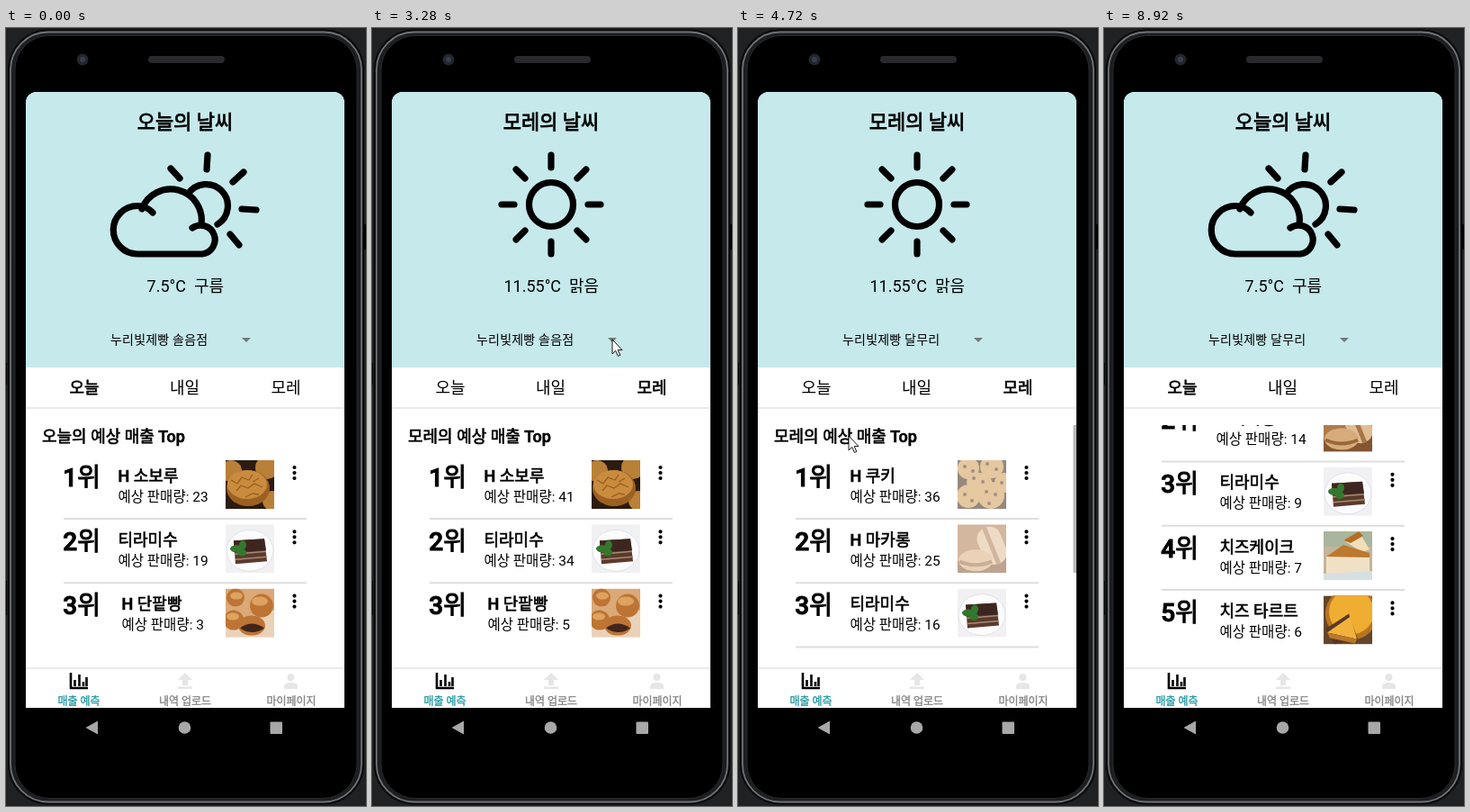
Recreate the animation shown at these times as an HTML page. Size 400 by 864 pixels, loop 8.96 s.

```html
<!DOCTYPE html>
<html lang="ko">
<head>
<meta charset="utf-8">
<title>Sales forecast</title>
<style>
  html, body { margin: 0; width: 100%; height: 100%; overflow: hidden; background: #202123; }
  svg { display: block; width: 400px; height: 864px; }
  text { font: 18px Roboto, "Noto Sans CJK KR", "Noto Sans CJK", sans-serif; white-space: pre; }
  .mid { text-anchor: middle; }
  .bold { font-weight: 500; stroke: #000; stroke-width: .036em; }
  .title { font-size: 22px; }
  .rank { font-size: 28px; }
  .sales { font-size: 15.5px; }
  .store { font-size: 14px; letter-spacing: .2px; }
  .tab { font-size: 12px; font-weight: 500; fill: #858585; stroke: #858585; stroke-width: .03em; }
  .active { fill: #259ba4; stroke: #259ba4; }
  .icon { fill: none; stroke: #000; stroke-width: 7.2; stroke-linecap: round; stroke-linejoin: round; }
</style>
</head>
<body>
<svg viewBox="0 0 400 864">
  <defs>
    <clipPath id="screen"><path d="M22 755V83a12 12 0 0 1 12-12H364a12 12 0 0 1 12 12V755z"/></clipPath>
    <clipPath id="view"><rect x="22" y="441" width="354" height="252"/></clipPath>
    <clipPath id="photo"><rect width="54" height="54"/></clipPath>
    <g id="soboru">
      <rect width="54" height="54" fill="#2c1b0f"/>
      <g fill="#b98038"><circle cx="46" cy="8" r="13"/><circle cx="6" cy="12" r="12"/><circle cx="52" cy="45" r="11"/></g>
      <ellipse cx="25" cy="31" rx="24" ry="20" fill="#9c6122"/><ellipse cx="24" cy="27" rx="22" ry="16" fill="#c98b3e"/>
      <path d="M6 22l7 4 5-7 8 3 4-6M12 34l5-6 8 3 7-5 9 4M22 41l8-4 7 1M30 24l7-4" fill="none" stroke="#98601f" stroke-width="1.3"/>
    </g>
    <g id="tiramisu">
      <rect width="54" height="54" fill="#f1f1f4"/>
      <ellipse cx="27" cy="29" rx="26" ry="23" fill="#fcfcfd" stroke="#dfe0e6"/>
      <path d="M9 18l34-2 3 25-35 3z" fill="#5b3a2c"/><path d="M9 18l34-2 2 13-35 2z" fill="#3d2620"/>
      <path d="M10 33l35-3M11 39l35-3" stroke="#a58a75" stroke-width="1.5"/>
      <g fill="#34782e"><ellipse cx="12" cy="27" rx="7" ry="4"/><ellipse cx="18" cy="31" rx="5" ry="4"/><ellipse cx="19" cy="23" rx="4" ry="5"/></g>
    </g>
    <g id="bun">
      <rect width="54" height="54" fill="#dba878"/><path d="M0 38l54-14v30H0z" fill="#e9d2b8"/>
      <g fill="#bd7434"><circle cx="11" cy="10" r="10"/><circle cx="40" cy="19" r="13"/><circle cx="9" cy="35" r="11"/><ellipse cx="29" cy="41" rx="15" ry="11"/></g>
      <g fill="#dda35f"><ellipse cx="12" cy="8" rx="7" ry="4"/><ellipse cx="38" cy="14" rx="9" ry="5"/><ellipse cx="8" cy="31" rx="7" ry="4"/></g>
      <path d="M16 44q13-10 27 0-13 9-27 0z" fill="#40251c"/>
    </g>
    <g id="cookie">
      <rect width="54" height="54" fill="#3c2413"/>
      <g fill="#d09a50"><circle cx="12" cy="9" r="12"/><circle cx="38" cy="7" r="13"/><circle cx="52" cy="25" r="11"/><circle cx="12" cy="40" r="13"/><circle cx="37" cy="39" r="15"/><ellipse cx="24" cy="24" rx="14" ry="10"/></g>
      <path d="M8 7h0m9 5h0m16-8h0m10 6h0m6 15h0m-31-5h0m10 4h0m-20 14h0m8 7h0m16-10h0m10 3h0m-7 10h0" stroke="#593018" stroke-width="4" stroke-linecap="round"/>
    </g>
    <g id="macaron">
      <rect width="54" height="54" fill="#ad7b4d"/><path d="M0 40l54-9v23H0z" fill="#845532"/>
      <g transform="rotate(-22 38 22)"><rect x="24" y="2" width="27" height="43" rx="13" fill="#e0bd93"/><path d="M37 2v43" stroke="#a67749" stroke-width="5"/></g>
      <ellipse cx="20" cy="40" rx="19" ry="12" fill="#d7ac7c"/><path d="M2 41q18 8 36 0" fill="none" stroke="#9b673b" stroke-width="4"/>
    </g>
    <g id="cheesecake">
      <rect width="54" height="54" fill="#c4b49b"/><path d="M0 0h54v17H0z" fill="#a9b59c"/>
      <path d="M22 10L39 0l12 20-8 3z" fill="#f2dfba"/><path d="M22 10L39 0l5 5-14 8z" fill="#b56c25"/>
      <path d="M3 28l19-12 29 9v21L3 48z" fill="#f0e1c6"/><path d="M3 28l19-13 29 9v5z" fill="#bd792e"/>
      <path d="M0 47l54-3v10H0z" fill="#d6e0e0"/>
    </g>
    <g id="tart">
      <rect width="54" height="54" fill="#65452c"/><circle cx="31" cy="20" r="29" fill="#b87520"/><circle cx="31" cy="18" r="25" fill="#efad31"/>
      <path d="M28 20l-26 17 10 17 26-6z" fill="#5b3822"/><path d="M30 23L4 41l33 7z" fill="#f1b23c"/><path d="M4 41l33 7-2 5-28-6z" fill="#b8782a"/>
    </g>
  </defs>

  <rect width="400" height="864" fill="#202123"/>
  <rect x="3" y="2.500" width="394" height="859" rx="44" fill="#17181a" stroke="#0a0a0b" stroke-width="2"/>
  <rect x="5" y="4.500" width="390" height="855" rx="42" fill="#1d1e20" stroke="#6f7277" stroke-width="1.800"/>
  <rect x="10" y="8.500" width="380" height="847" rx="38" fill="#000" stroke="#28292c"/>
  <path d="M0 372v24M399 218v28M0 614v38" stroke="#000" stroke-width="2"/>
  <rect x="158" y="31" width="85" height="8" rx="4" fill="#29292c"/>
  <circle cx="85" cy="35" r="6.500" fill="#24262b"/><circle cx="85" cy="35" r="3" fill="#34404f"/>

  <g clip-path="url(#screen)">
    <rect x="22" y="71" width="354" height="685" fill="#fff"/>
    <rect x="22" y="71" width="354" height="306" fill="#c6e9eb"/>
    <text id="title" class="bold title mid" x="199" y="112"></text>
    <path id="sun" class="icon"/>
    <path id="cloud" class="icon" d="M163 205Q156 197.500 146 197.500a26.750 26.750 0 0 0 0 53.500H218a16 16 0 1 0-11-29M151 201A34.300 34.300 0 0 1 217 218M202.300 184.500A24 24 0 1 1 235 218M183 156l10 11M224 141l-1 16M264 160l-12 11M262 201l16 1M249 229l10 12"/>
    <text id="temp" class="mid" x="199.300" y="293"></text>
    <text id="store" class="store" x="116" y="351"></text>
    <path d="M262 344h10l-5 5z" fill="#737879"/>
    <g id="days"></g>
    <path d="M22 422H376M22 711H376" stroke="#e3e3e3" stroke-width="1.600"/>

    <g clip-path="url(#view)">
      <g id="list"></g>
      <path id="glow" d="M22 441H376V457Q199 493 22 457z" fill="#eee" opacity="0"/>
      <rect id="bar" x="372.500" width="3.500" height="164" fill="#b8b8b8"/>
    </g>

    <path d="M72 716V733H91M76.500 731V724M81.500 731V718M86 731V726M89.500 731V721" fill="none" stroke="#000" stroke-width="2.600"/>
    <path d="M199 716l8 8h-5v6h-6v-6h-5zM191 731.500h16v2.500h-16zM309 734v-3q0-4 7.500-4t7.500 4v3z" fill="#e6e6e6"/>
    <circle cx="316.500" cy="721" r="4" fill="#e6e6e6"/>
    <text class="tab active mid" x="81" y="752">매출 예측</text>
    <text class="tab mid" x="199" y="752">내역 업로드</text>
    <text class="tab mid" x="317" y="752">마이페이지</text>

    <rect id="dim" x="22" y="71" width="354" height="685" opacity="0"/>
    <g id="status" fill="#fff">
      <text x="29" y="86" style="font-size:13px">1:56</text>
      <circle cx="69.500" cy="81.500" r="4" fill="none" stroke="#fff" stroke-width="2.600"/>
      <circle cx="69.500" cy="81.500" r="5.300" fill="none" stroke="#fff" stroke-dasharray="2 2.160"/>
      <circle cx="89.500" cy="81.500" r="6.500"/><rect x="104" y="76" width="12" height="11"/>
      <path d="M130 75l5.500 2v4q0 5-5.500 7-5.500-2-5.500-7v-4z"/><circle cx="149.500" cy="81.500" r="1.800"/>
      <path d="M329 78q6.500-5 13 0l-6.500 9zM344 87l10-11v11zM362 77h2v-1.500h3V77h2v10h-7z"/>
    </g>
    <g id="dialog">
      <rect x="45" y="352" width="307" height="144" rx="2" fill="#fff" style="filter:drop-shadow(0 5px 9px #0007)"/>
      <rect id="pressed" x="104" y="445" width="191" height="45" rx="3" opacity=".08"/>
    </g>
  </g>

  <path d="M102 769.500v15l-13.500-7.500z" fill="#a8a8a8"/>
  <circle cx="198.500" cy="777" r="6.800" fill="#a8a8a8"/>
  <rect x="293.500" y="770.500" width="13.500" height="13.500" rx="1" fill="#a8a8a8"/>
  <path id="cursor" d="M0 0V16l3.700-3.600 2.700 6 2.400-1-2.600-5.800H11z" fill="#fff" stroke="#000" stroke-width=".9"/>
</svg>
<script>
const LOOP = 8960, MAX_SCROLL = 134.8, PITCH = 71.3;
const $ = id => document.getElementById(id);
const set = (id, name, value) => $(id).setAttribute(name, value);
const show = (id, on) => $(id).style.display = on ? '' : 'none';
const clamp = v => Math.max(0, Math.min(1, v));
const label = (x, y, cls, text) => `<text x="${x}" y="${y}" class="${cls}">${text}</text>`;

const days = ['오늘', '내일', '모레'];
const temps = ['7.5°C  구름', '8.49°C  맑음', '11.55°C  맑음'];
const stores = ['누리빛제빵 솔음점', '누리빛제빵 해온점', '누리빛제빵 달무리'];
const shortMenu = [['H 소보루', 'soboru'], ['티라미수', 'tiramisu'], ['H 단팥빵', 'bun']];
const longMenu = [['H 쿠키', 'cookie'], ['H 마카롱', 'macaron'], ['티라미수', 'tiramisu'],
  ['치즈케이크', 'cheesecake'], ['치즈 타르트', 'tart']];

// start time, day, store, sales per row (none while loading)
const scenes = [
  [0, 0, 0, [23, 19, 3]],
  [1340, 1, 0, []],
  [1560, 1, 0, [41, 34, 5]],
  [2640, 2, 0, []],
  [2900, 2, 0, [41, 34, 5]],
  [3920, 2, 2, [41, 34, 5]],
  [4120, 2, 2, []],
  [4560, 2, 2, [36, 25, 16, 12, 9]],
  [5360, 0, 2, []],
  [5860, 0, 2, [20, 14, 9, 7, 6]]
];
const pointer = [[380, 398, 440], [900, 205, 402], [2180, 200, 400], [2460, 318, 402], [2900, 318, 402],
  [3200, 267, 346], [3460, 267, 346], [3740, 161, 502], [4050, 161, 502], [4680, 123, 453], [4820, 123, 453],
  [5200, 87, 400], [5500, 87, 400], [5720, 96, 446], [5780, 96, 446], [6120, 165, 640], [6420, 165, 500],
  [6560, 165, 480], [6800, 163, 616], [6960, 163, 616], [7400, 165, 430], [8000, 165, 400]];
const scrolling = [[6150, 0], [6420, MAX_SCROLL], [6560, MAX_SCROLL], [6800, 0], [6960, 0], [7700, MAX_SCROLL]];

function track(keys, t) {
  const i = keys.findIndex(k => k[0] > t);
  if (i < 0) return keys[keys.length - 1].slice(1);
  if (i === 0) return keys[0].slice(1);
  const a = keys[i - 1], b = keys[i];
  let p = (t - a[0]) / (b[0] - a[0]);
  p = p * p * (3 - 2 * p);
  return a.slice(1).map((v, n) => v + (b[n + 1] - v) * p);
}

function row(menu, count, i) {
  const y = i * PITCH, x = count > 9 ? 124.5 : 128.5;
  const [name, picture] = menu[i];
  const line = i < menu.length - 1 ? `<path d="M64 ${545 + y}H334" stroke="#dedede" stroke-width="2"/>` : '';
  return label(63.3, 508.5 + y, 'bold rank', i + 1 + '위') + label(x, 503.5 + y, 'bold', name) +
    label(x, 525.5 + y, 'sales', '예상 판매량: ' + count) +
    `<g class="${picture}" transform="translate(244 ${480 + y})" clip-path="url(#photo)"><use href="#${picture}"/></g>` +
    `<path d="M320.500 ${488 + y}v0m0 6v0m0 6v0" stroke="#000" stroke-width="4.200" stroke-linecap="round"/>` + line;
}

function build([, day, store, sales]) {
  $('title').textContent = days[day] + '의 날씨';
  $('temp').textContent = temps[day];
  $('store').textContent = stores[store];
  show('cloud', day === 0);
  show('sun', day > 0);
  $('days').innerHTML = days.map((d, i) => label([87, 198.5, 311][i], 406, i === day ? 'mid bold' : 'mid', d)).join('');
  const menu = sales.length > 3 ? longMenu : shortMenu;
  $('list').innerHTML = label(40, 459.5, 'bold', days[day] + '의 예상 매출 Top') +
    sales.map((n, i) => row(menu, n, i)).join('');
}

let current;
function draw(now) {
  const t = now % LOOP;
  const scene = scenes.filter(s => s[0] <= t).pop();
  if (scene !== current) build(current = scene);

  const [scroll] = track(scrolling, t);
  set('list', 'transform', `translate(0 ${-scroll})`);
  set('bar', 'y', 441 + 90 * scroll / MAX_SCROLL);
  set('bar', 'opacity', scene[3].length > 3 ? clamp((8400 - t) / 250) : 0);
  set('glow', 'opacity', t > 6750 ? .22 * clamp((7100 - t) / 200) : 0);
  for (const p of ['cookie', 'macaron'])
    document.querySelectorAll('#list .' + p).forEach(el => el.setAttribute('opacity', clamp((t - 4560) / 300)));

  const open = t < 3920 ? clamp((t - 3480) / 200) : clamp((4220 - t) / 300);
  set('dim', 'opacity', .6 * open);
  set('dialog', 'opacity', open * open);
  show('status', open > 0);
  show('pressed', t > 3920);

  const [x, y] = track(pointer, t);
  set('cursor', 'transform', `translate(${x} ${y})`);
  show('cursor', t >= 380 && t < 8300);
  requestAnimationFrame(() => draw(performance.now() - start));
}

let rays = 'M223.500 196a24.500 24.500 0 1 0-49 0a24.500 24.500 0 1 0 49 0';
for (let i = 0; i < 8; i++) {
  const c = Math.cos(i * Math.PI / 4), s = Math.sin(i * Math.PI / 4);
  rays += `M${199 + 41 * c} ${196 + 41 * s}L${199 + 55 * c} ${196 + 55 * s}`;
}
set('sun', 'd', rays);
$('dialog').insertAdjacentHTML('beforeend', stores.map((s, i) => label(53, 385.5 + 43.3 * i, 'store', s)).join(''));
const start = performance.now();
draw(0);
</script>
</body>
</html>
```
